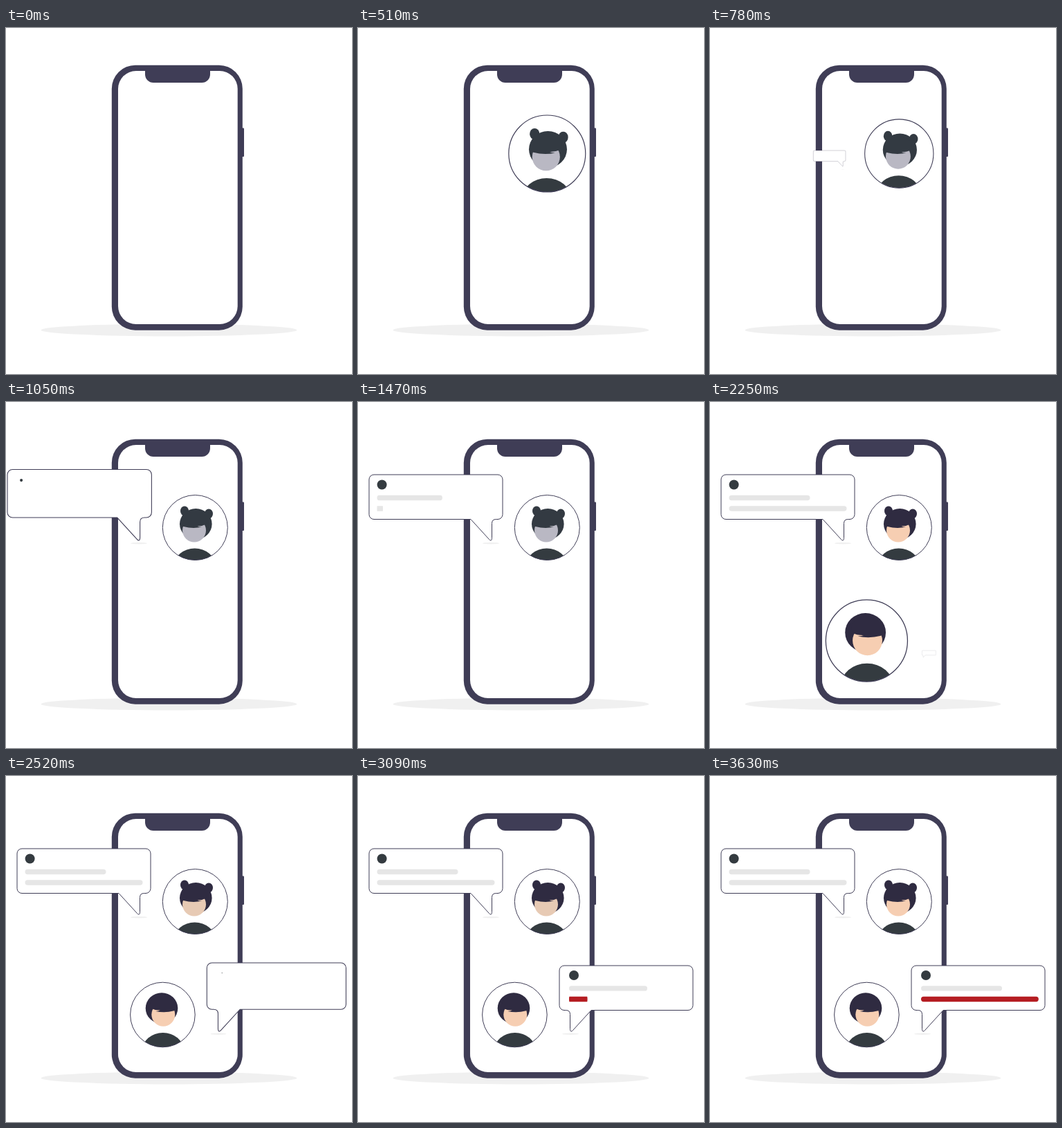
An HTML page that plays this animation: 500x500 px, repeating every 5.01 s.

```html
<!DOCTYPE html>
<html lang="en">
<head>
<meta charset="utf-8">
<title>Chat</title>
<style>
  html, body { margin: 0; width: 100%; height: 100%; overflow: hidden; background: #fff; }
  svg { display: block; width: 100%; height: 100%; }
  .hair { fill: var(--hair); }
  .body { fill: #343b40; }
  .line { fill: none; stroke: #3f3d56; }
</style>
</head>
<body>
<svg viewBox="0 0 500 500">
  <defs>
    <g id="head">
      <ellipse class="hair" cx="274.3" cy="176.3" rx="23.3" ry="22.3"/>
      <circle cx="272" cy="185.5" r="17" fill="var(--face)"/>
      <path class="hair" d="M253 176Q254 179 256.5 180Q270 183.5 283 180.6Q278.500 180.400 276.400 179.300Q284 179.500 289.500 176.500L291 166L274 156L256 164Z"/>
    </g>
    <ellipse id="torso" class="body" cx="272.7" cy="237" rx="30" ry="25.5"/>
    <path id="balloon" class="line" style="fill:#fff" d="M23 105H202a7 7 0 0 1 7 7V162.500a7 7 0 0 1-7 7H199.500q-6 0-6 6V196.500c0 4-2 4.500-4 2L163 169.500H23a7 7 0 0 1-7-7V112a7 7 0 0 1 7-7Z"/>
    <clipPath id="clip1"><circle cx="273.3" cy="181.5" r="47"/></clipPath>
    <clipPath id="clip2"><circle cx="226.4" cy="345" r="46.8"/></clipPath>
  </defs>

  <ellipse cx="235.5" cy="436.5" rx="185" ry="9" fill="#f0f0f0"/>
  <g fill="#3f3d56">
    <rect x="340" y="144.500" width="4" height="41.500" rx="1"/>
    <rect x="152.800" y="53.700" width="189" height="383" rx="34"/>
    <rect x="162" y="62" width="172.700" height="366" rx="26" fill="#fff"/>
    <path d="M201 61H295V67a12 12 0 0 1-12 12H213a12 12 0 0 1-12-12Z"/>
  </g>

  <g id="avatar1">
    <circle cx="273.3" cy="181.5" r="47" fill="#fff"/>
    <use href="#torso" clip-path="url(#clip1)"/>
    <ellipse class="hair" cx="258" cy="157.500" rx="6" ry="7"/>
    <ellipse class="hair" cx="293" cy="161.500" rx="6" ry="7"/>
    <use href="#head"/>
    <circle class="line" cx="273.3" cy="181.5" r="47"/>
  </g>
  <g id="avatar2">
    <circle cx="226.4" cy="345" r="46.8" fill="#fff"/>
    <g clip-path="url(#clip2)"><use href="#torso" transform="translate(499.500 159.500) scale(-1 1)"/></g>
    <use href="#head" transform="translate(499.300 159.300) scale(-1 1)"/>
    <circle class="line" cx="226.4" cy="345" r="46.8"/>
  </g>

  <ellipse id="shade1" cx="192" cy="204.200" rx="12" ry="1.300" fill="#f0f0f0"/>
  <g id="bubble1">
    <use href="#balloon"/>
    <circle id="dot1" class="body" cx="34.600" cy="119.500" r="7"/>
    <rect id="short1" x="27.500" y="134.800" width="117" height="7.400" rx="3.700" fill="#e6e6e6"/>
    <rect id="long1" x="27.500" y="150.300" width="170" height="7.400" rx="3.700" fill="#e6e6e6"/>
  </g>
  <ellipse id="shade2" cx="307" cy="372.700" rx="12" ry="1.300" fill="#f0f0f0"/>
  <g id="bubble2">
    <use href="#balloon" transform="translate(500 169) scale(-1 1)"/>
    <circle id="dot2" class="body" cx="312" cy="288" r="7"/>
    <rect id="short2" x="305" y="303.200" width="117" height="7.400" rx="3.700" fill="#e6e6e6"/>
    <rect id="long2" x="305" y="318.800" width="170" height="7.400" rx="3.700" fill="#b51d22"/>
  </g>
</svg>
<script>
const LOOP = 5010, STEP = 30;
const root = document.documentElement.style;
const el = id => document.getElementById(id);

// Eased progress from 0 to 1
const ease = (t, start, length) => {
  const p = Math.min(1, Math.max(0, (t - start) / length));
  return (1 - Math.cos(p * Math.PI)) / 2;
};
// Grow past full size to the peak, then settle at 1
const pop = (t, start, rise, peak, settle) =>
  peak * ease(t, start, rise) - (peak - 1) * ease(t, start + rise, settle);

function scale(id, x, y, sx, sy = sx) {
  const node = el(id);
  node.style.display = sx > 0.002 ? '' : 'none';
  node.setAttribute('transform', `translate(${x} ${y}) scale(${sx} ${sy}) translate(${-x} ${-y})`);
}

function draw(t) {
  scale('avatar1', 273.3, 181.5, pop(t, 33, 573, 1.266, 250));
  scale('avatar2', 226.4, 345, pop(t, 1649, 573, 1.27, 250));

  scale('shade1', 192, 204.2, ease(t, 650, 415));
  scale('bubble1', 191.8, 200, pop(t, 650, 415, 1.083, 217));
  scale('dot1', 34.6, 119.5, ease(t, 912, 395));
  scale('short1', 27.5, 0, ease(t, 1115, 500), 1);
  scale('long1', 27.5, 0, ease(t, 1362, 750), 1);

  scale('shade2', 307, 372.7, ease(t, 2170, 400));
  scale('bubble2', 308.2, 369, pop(t, 2170, 400, 1.083, 217));
  scale('dot2', 312, 288, ease(t, 2452, 395));
  scale('short2', 305, 0, ease(t, 2649, 500), 1);
  scale('long2', 305, 0, ease(t, 2896, 750), 1);

  const grey = t < 1700;
  root.setProperty('--hair', grey ? '#333a42' : '#2f2b41');
  root.setProperty('--face', grey ? '#b9b8c3' : '#f6ceb2');
  el('avatar1').style.setProperty('--face', grey ? '#b9b8c3' : t > 2250 && t < 3300 ? '#e7cab4' : '#f6ceb2');
}

function tick() {
  const t = performance.now() % LOOP;
  draw(Math.floor(t / STEP) * STEP);
  requestAnimationFrame(tick);
}
tick();
</script>
</body>
</html>
```
